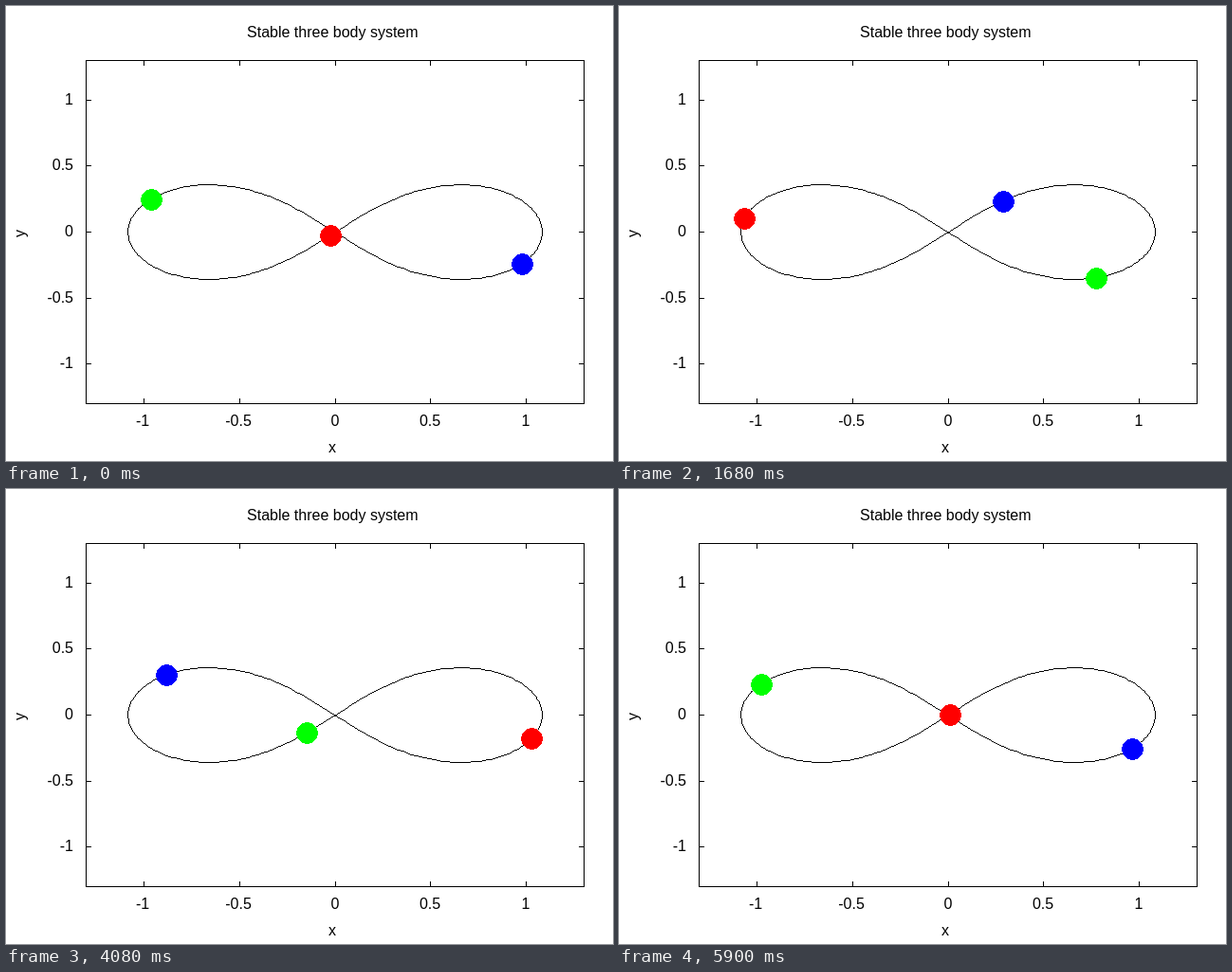
These frames come from a looping animation (640x480 px, 5.92 s). An HTML page with a canvas:

```html
<!DOCTYPE html>
<html lang="en">
<head>
<meta charset="utf-8">
<title>Stable three body system</title>
<style>
html, body { margin: 0; width: 100%; height: 100%; overflow: hidden; background: #fff; }
canvas, svg { position: absolute; left: 0; top: 0; width: 640px; height: 480px; }
text { font: 16px "Liberation Sans", Arial, sans-serif; fill: #000; }
</style>
</head>
<body>
<canvas id="plot" width="640" height="480"></canvas>
<svg id="labels" viewBox="0 0 640 480">
  <text x="344.3" y="33" text-anchor="middle">Stable three body system</text>
  <text x="344" y="471" text-anchor="middle">x</text>
  <text transform="translate(20 240) rotate(-90)" text-anchor="middle">y</text>
</svg>
<script>
const STEP_MS = 20, STEPS = 296, DT = 0.64 / 30;
const LEFT = 84, RIGHT = 609, TOP = 57, BOTTOM = 419, LIMIT = 1.3, TICK = 5;
const COLORS = ['#f00', '#0f0', '#00f'];
// Half-width of the disc for each row away from its centre
const DISC = [11, 11, 11, 10, 10, 10, 9, 8, 7, 6, 5, 2];

const scale = (v, size) => Math.floor((v + LIMIT) / (2 * LIMIT) * size + 0.5);
const px = x => LEFT + scale(x, RIGHT - LEFT);
const py = y => BOTTOM - scale(y, BOTTOM - TOP);

// Figure-eight orbit: three equal masses under gravity, velocity Verlet
function simulate() {
  const vx = -0.93240737, vy = -0.86473146, ax = 0.97000436, ay = -0.24308753;
  const pos = [[0, 0], [-ax, -ay], [ax, ay]];
  const vel = [[vx, vy], [-vx / 2, -vy / 2], [-vx / 2, -vy / 2]];
  const sub = 40, h = DT / sub;

  function kick(dt) {
    for (let i = 0; i < 3; i++) {
      for (let j = 0; j < 3; j++) {
        if (i === j) continue;
        const dx = pos[j][0] - pos[i][0], dy = pos[j][1] - pos[i][1];
        const r3 = Math.hypot(dx, dy) ** 3;
        vel[i][0] += dt * dx / r3;
        vel[i][1] += dt * dy / r3;
      }
    }
  }

  const states = [];
  for (let n = 0; n <= STEPS; n++) {
    for (let s = 0; s < sub; s++) {
      kick(h / 2);
      pos.forEach((p, i) => { p[0] += h * vel[i][0]; p[1] += h * vel[i][1]; });
      kick(h / 2);
    }
    states.push(pos.map(p => [...p]));
  }
  return states;
}

// Hard-edged one pixel line
function line(g, x0, y0, x1, y1) {
  const n = Math.max(Math.abs(x1 - x0), Math.abs(y1 - y0), 1);
  for (let i = 0; i <= n; i++) {
    g.fillRect(Math.round(x0 + (x1 - x0) * i / n), Math.round(y0 + (y1 - y0) * i / n), 1, 1);
  }
}

function label(text, x, y, anchor) {
  const el = document.createElementNS('http://www.w3.org/2000/svg', 'text');
  el.setAttribute('x', x);
  el.setAttribute('y', y);
  el.setAttribute('text-anchor', anchor);
  el.textContent = text;
  document.getElementById('labels').append(el);
}

function drawBackdrop(states) {
  const c = document.createElement('canvas');
  c.width = 640;
  c.height = 480;
  const g = c.getContext('2d');
  g.fillStyle = '#fff';
  g.fillRect(0, 0, 640, 480);
  g.fillStyle = '#000';

  const path = states.map(s => [px(s[0][0]), py(s[0][1])]);
  path.forEach((p, i) => line(g, ...p, ...path[(i + 1) % path.length]));

  line(g, LEFT, TOP, RIGHT, TOP);
  line(g, LEFT, BOTTOM, RIGHT, BOTTOM);
  line(g, LEFT, TOP, LEFT, BOTTOM);
  line(g, RIGHT, TOP, RIGHT, BOTTOM);

  for (const v of [-1, -0.5, 0, 0.5, 1]) {
    const x = px(v), y = py(v);
    line(g, x, TOP, x, TOP + TICK);
    line(g, x, BOTTOM - TICK, x, BOTTOM);
    line(g, LEFT, y, LEFT + TICK, y);
    line(g, RIGHT - TICK, y, RIGHT, y);
    label(v, v < 0 ? x - 1 : x, 443, 'middle');
    label(v, 71, y + 5, 'end');
  }
  return c;
}

function disc(g, x, y, color) {
  g.fillStyle = color;
  DISC.forEach((w, dy) => {
    g.fillRect(x - w, y - dy, 2 * w + 1, 1);
    g.fillRect(x - w, y + dy, 2 * w + 1, 1);
  });
}

const ctx = document.getElementById('plot').getContext('2d');
const states = simulate();
const backdrop = drawBackdrop(states);
const start = performance.now();

function draw() {
  const step = Math.floor((performance.now() - start) / STEP_MS) % STEPS;
  ctx.drawImage(backdrop, 0, 0);
  states[step].forEach(([x, y], i) => disc(ctx, px(x), py(y) + 1, COLORS[i]));
  requestAnimationFrame(draw);
}
draw();
</script>
</body>
</html>
```
